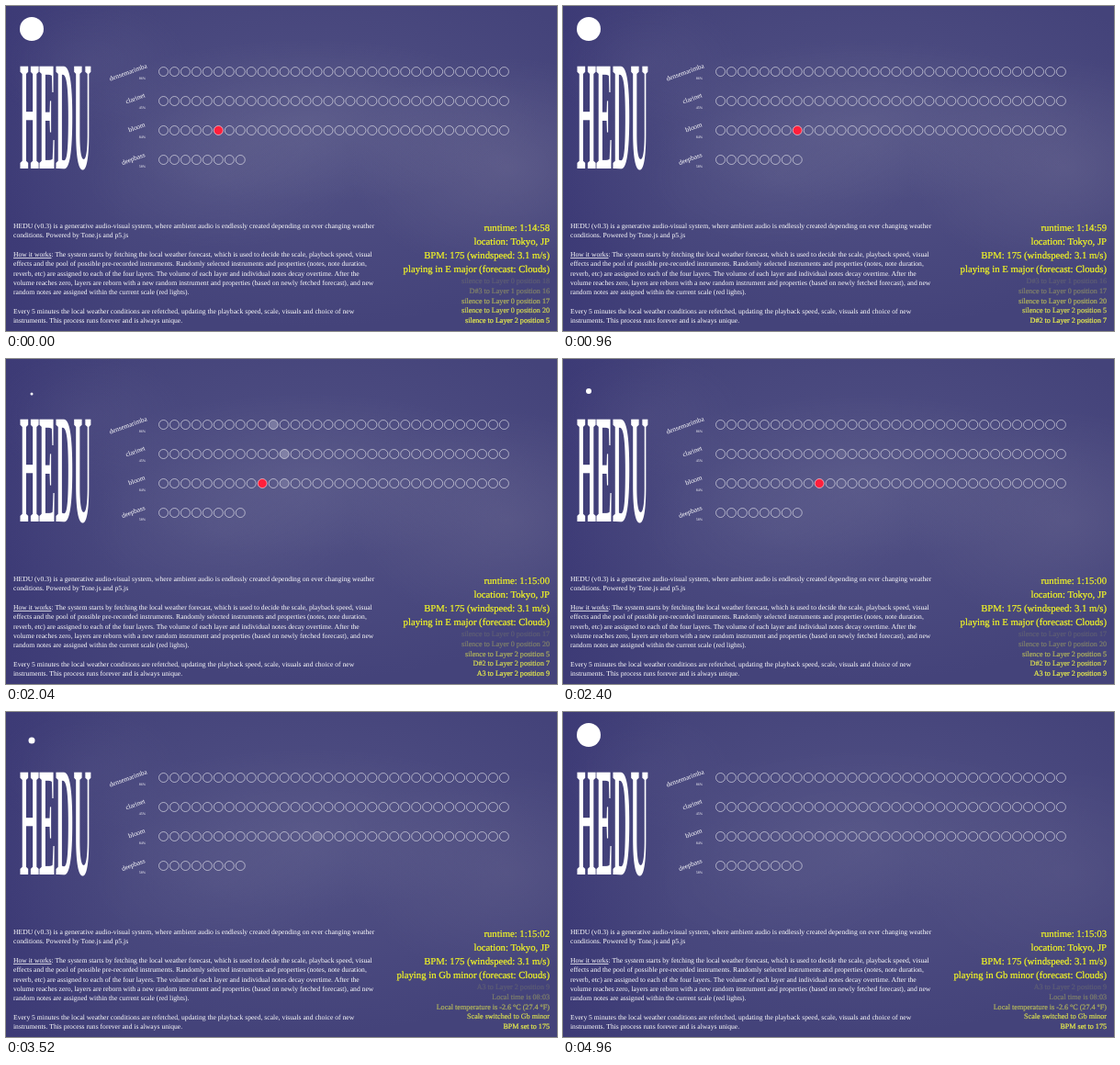
An HTML page for the animation above (5 s loop, 600 by 354 pixels).

```html
<!DOCTYPE html>
<html lang="en">
<head>
<meta charset="utf-8">
<title>Generative audio</title>
<style>
html, body { margin: 0; width: 100%; height: 100%; overflow: hidden; background: #44437a; }
.sky, svg { position: absolute; left: 0; top: 0; width: 100%; height: 100%; overflow: hidden; }
#haze {
  background:
    radial-gradient(ellipse 250px 90px at 330px 125px, rgba(118,118,154,.36), transparent),
    radial-gradient(ellipse 150px 80px at 235px 185px, rgba(112,112,152,.28), transparent),
    radial-gradient(ellipse 170px 120px at 545px 175px, rgba(118,115,152,.46), transparent),
    radial-gradient(ellipse 110px 70px at 90px 60px, rgba(100,98,145,.25), transparent);
}
#veil {
  background:
    radial-gradient(ellipse 360px 200px at 330px 150px, rgba(98,98,146,.46), transparent),
    linear-gradient(90deg, rgba(50,46,112,.4), transparent 22%);
}
svg { display: block; font-family: "Liberation Serif", "Times New Roman", serif; fill: #fff; text-rendering: geometricPrecision; }
.title { font-size: 170px; font-weight: bold; }
.label { font-size: 7.4px; text-anchor: end; }
.level { font-size: 4px; text-anchor: end; }
.body { font-size: 7.63px; }
.status { font-size: 10.7px; text-anchor: end; fill: #f6fa22; stroke: #f6fa22; stroke-width: .2; }
.log { font-size: 8.1px; text-anchor: end; fill: #eef34a; stroke: #eef34a; stroke-width: .2; }
.dot { fill-opacity: 0; stroke: #fff; stroke-opacity: .72; stroke-width: .75; }
</style>
</head>
<body>
<div class="sky" id="veil"></div>
<div class="sky" id="haze"></div>
<svg id="stage" viewBox="0 0 600 354"></svg>
<script>
const LOOP = 5000, STEP = 60000 / 175, FADE = 700;
const stepTime = n => 500 + (n - 7) * STEP;
const stage = document.getElementById('stage');
const haze = document.getElementById('haze');

function add(tag, attrs, text = '') {
  const el = document.createElementNS('http://www.w3.org/2000/svg', tag);
  for (const k in attrs) el.setAttribute(k, attrs[k]);
  el.textContent = text;
  return stage.appendChild(el);
}
const write = (cls, x, y, text) => add('text', { class: cls, x, y }, text);

const badge = add('circle', { cx: 28, cy: 25, r: 13 });
add('text', { class: 'title', transform: 'translate(15 177) scale(.159 1)' }, 'HEDU');

// Layers of the sequencer: name, label position, volume, dots
const layers = [
  ['densemarimba', 154, 67, '86%', 32],
  ['clarinet', 152, 99, '45%', 32],
  ['bloom', 152, 131, '84%', 32],
  ['deepbass', 152, 164, '58%', 8]
];
const dots = layers.map(([name, x, y, level, count], row) => {
  add('text', { class: 'label', transform: `translate(${x} ${y}) rotate(-20)` }, name);
  write('level', 152, 79.5 + row * 32, level);
  return Array.from({ length: count }, (_, i) =>
    add('circle', { class: 'dot', cx: 171.5 + i * 11.965, cy: 71.5 + row * 32, r: 5 }));
});

[
  [242, 'HEDU (v0.3) is a generative audio-visual system, where ambient audio is endlessly created depending on ever changing weather'],
  [252.4, 'conditions. Powered by Tone.js and p5.js'],
  [273, ''],
  [283.3, 'effects and the pool of possible pre-recorded instruments. Randomly selected instruments and properties (notes, note duration,'],
  [293.6, 'reverb, etc) are assigned to each of the four layers. The volume of each layer and individual notes decay overtime. After the'],
  [303.9, 'volume reaches zero, layers are reborn with a new random instrument and properties (based on newly fetched forecast), and new'],
  [314.2, 'random notes are assigned within the current scale (red lights).'],
  [335, 'Every 5 minutes the local weather conditions are refetched, updating the playback speed, scale, visuals and choice of new'],
  [345.4, 'instruments. This process runs forever and is always unique.']
].forEach(([y, text]) => {
  const line = write('body', 8, y, text);
  if (!text) line.innerHTML = '<tspan text-decoration="underline">How it works</tspan>: The system starts by fetching the local weather forecast, which is used to decide the scale, playback speed, visual';
});

const runtime = write('status', 592, 244.6, '');
write('status', 592, 259.7, 'location: Tokyo, JP');
write('status', 592, 274.8, 'BPM: 175 (windspeed: 3.1 m/s)');
const scale = write('status', 592, 289.9, '');

const log = [
  'silence to Layer 0 position 18',
  'D#3 to Layer 1 position 16',
  'silence to Layer 0 position 17',
  'silence to Layer 0 position 20',
  'silence to Layer 2 position 5',
  'D#2 to Layer 2 position 7',
  'A3 to Layer 2 position 9',
  'Local time is 08:03',
  'Local temperature is -2.6 °C (27.4 °F)',
  'Scale switched to Gb minor',
  'BPM set to 175'
];
const logLines = [.14, .35, .65, .87, 1].map((opacity, i) => {
  const line = write('log', 592, 302 + i * 10.8, '');
  line.setAttribute('opacity', opacity);
  return line;
});

// start time, first log entry, red dot on the bloom layer
const phases = [
  [0, 0, 5],
  [stepTime(7), 1, 7],
  [stepTime(9), 2, 9],
  [2480, 6, -1]
];
// layer, step, volume
const notes = [[0, 10, .9], [1, 11, .33], [2, 11, .18], [0, 13, 1], [2, 14, 1]];

// start time, centre y, radius of the badge
const badgeSteps = [
  [0, 25, 13],
  [1900, 38, 1.5],
  [2300, 35, 3],
  [2840, 25, 13],
  [3420, 31, 3.5],
  [4540, 25, 13]
];

const at = (steps, t) => steps.filter(s => s[0] <= t).pop();

function setText(el, text) {
  if (el.textContent !== text) el.textContent = text;
}

function render(t) {
  const [, first, red] = at(phases, t);
  logLines.forEach((line, i) => setText(line, log[first + i]));

  const sec = 3600 + 14 * 60 + 58 + Math.floor((t + 560) / 1000);
  const pad = n => String(n).padStart(2, '0');
  setText(runtime, `runtime: 1:${pad(Math.floor(sec / 60) % 60)}:${pad(sec % 60)}`);
  setText(scale, `playing in ${first < 6 ? 'E major' : 'Gb minor'} (forecast: Clouds)`);

  for (const [row, n, volume] of notes) {
    const age = t - stepTime(n);
    dots[row][n].style.fillOpacity = age < 0 ? 0 : volume * Math.max(0, 1 - age / FADE);
  }
  for (const n of [5, 7, 9]) {
    const dot = dots[2][n];
    dot.style.fill = '#ff1f3c';
    dot.style.fillOpacity = n === red ? 1 : 0;
  }

  const [, cy, r] = at(badgeSteps, t);
  badge.setAttribute('cy', cy);
  badge.setAttribute('r', r);
  haze.style.opacity = .95 - .5 * t / LOOP;
}

const start = performance.now();
function tick() {
  render((performance.now() - start) % LOOP);
  requestAnimationFrame(tick);
}
tick();
</script>
</body>
</html>
```
